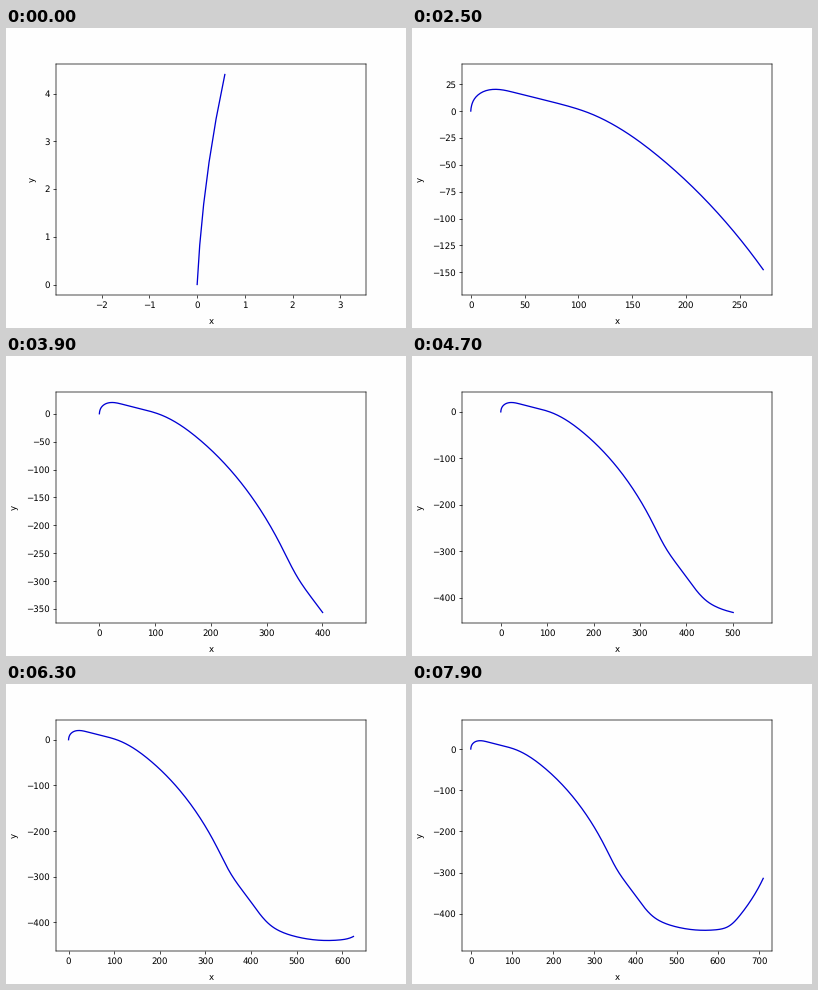
A matplotlib script for the animation above (8000 ms loop, 400 px wide and 300 px high).

```python
import matplotlib.pyplot as plt
import numpy as np
from matplotlib.animation import FuncAnimation

FRAMES = 80
STEPS = 5                              # path points added per frame
RATIO = (0.775 * 400) / (0.77 * 300)   # axes width / height

# bends of the path
KEYS = np.array([
    (0, 0), (0.58, 4.4), (2.7, 10.2), (10.3, 17.4), (23.7, 20.2),
    (40.7, 17.2), (80, 7.4), (110, -1.8), (130.5, -11.5), (175, -42.5),
    (224.6, -89.3), (272, -147.5), (326, -237), (357, -296),
    (400.5, -356.5), (447, -410), (500, -432), (591, -439.2),
    (622, -432.5), (652.5, -405), (710, -314),
])
# time in frames -> key reached
PACE = {0: 0, 1: 1, 15: 8, 26: 11, 40: 14, 56: 17, 72: 19, 80: 20}


def spline(u, knots, values):
    """Smooth cubic through the knots, with parabolic ends."""
    n, h = len(knots), np.diff(knots)
    slope = np.diff(values) / h
    a, b = np.zeros((n, n)), np.zeros(n)
    a[0, :2] = a[-1, -2:] = 1, -1
    for i in range(1, n - 1):
        a[i, i - 1:i + 2] = h[i - 1], 2 * (h[i - 1] + h[i]), h[i]
        b[i] = 6 * (slope[i] - slope[i - 1])
    m = np.linalg.solve(a, b)
    i = np.clip(np.searchsorted(knots, u, side="right") - 1, 0, n - 2)
    d = u - knots[i]
    start = slope[i] - h[i] * (2 * m[i] + m[i + 1]) / 6
    return (values[i] + start * d + m[i] * d ** 2 / 2
            + (m[i + 1] - m[i]) * d ** 3 / (6 * h[i]))


def build_path():
    chord = np.hypot(*np.diff(KEYS, axis=0).T)
    arc = np.concatenate([[0], np.cumsum(chord)])
    t = np.arange(FRAMES * STEPS + 1) / STEPS
    s = spline(t, np.array(list(PACE)), arc[list(PACE.values())])
    return [spline(s, arc, c) for c in KEYS.T]


def view_size(dx, dy):
    """Equal-aspect view size around data spanning dx by dy."""
    w, h = 1.1 * dx, 1.1 * dy
    if dx > 1.43 * dy:
        return 1.06 * dx, 1.06 * dx / RATIO
    if w > RATIO * h:
        fit_height = RATIO * h > 1.06 * dx
    else:
        fit_height = w < RATIO * 1.06 * dy
    return (RATIO * h, h) if fit_height else (w, w / RATIO)


path_x, path_y = build_path()

plt.rcParams.update({"path.snap": False, "text.hinting": "none",
                     "axes.labelpad": 9, "axes.facecolor": "#fefefe",
                     "figure.facecolor": "#fefefe"})
fig, ax = plt.subplots(figsize=(6.4, 4.8), dpi=62.5)
fig.subplots_adjust(left=0.125, right=0.9, bottom=0.11, top=0.88)
ax.set_xlabel("x")
ax.set_ylabel("y")
line, = ax.plot([], [], color="#0000d4", lw=1.5)


def update(frame):
    n = (frame + 1) * STEPS + 1
    x, y = path_x[:n], path_y[:n]
    line.set_data(x, y)
    w, h = view_size(np.ptp(x), np.ptp(y))
    cx, cy = (x.min() + x.max()) / 2, (y.min() + y.max()) / 2
    ax.set_xlim(cx - w / 2, cx + w / 2)
    ax.set_ylim(cy - h / 2, cy + h / 2)
    return line,


anim = FuncAnimation(fig, update, frames=FRAMES, interval=100,
                     repeat=True, repeat_delay=0)
plt.show()
```
